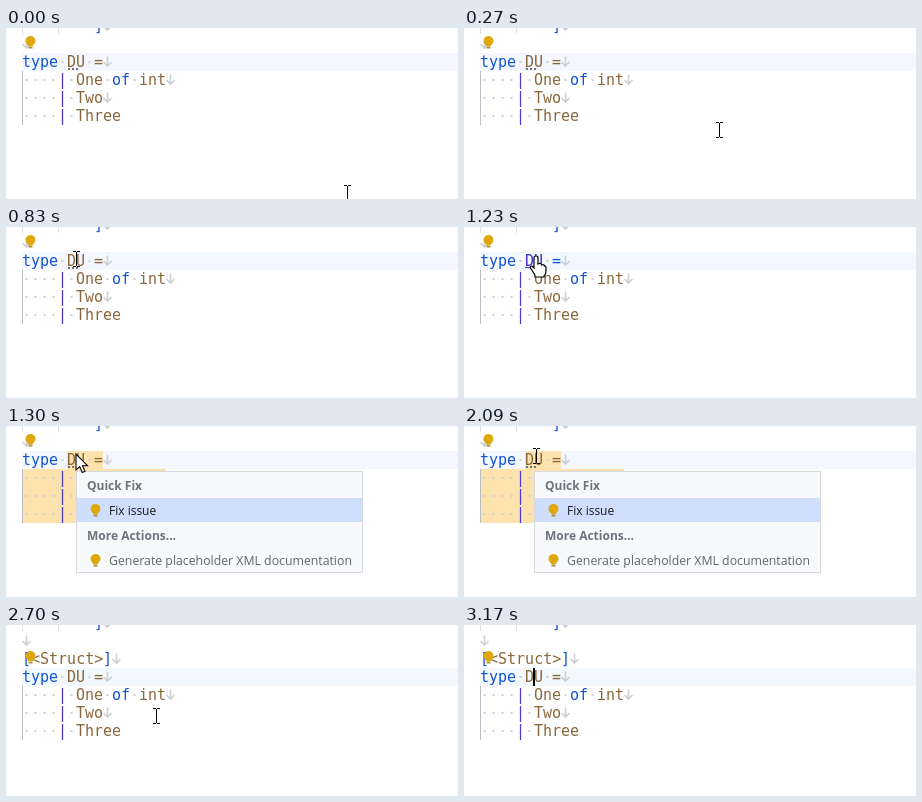
An HTML page for the animation above (3.24 s loop, 452 by 171 pixels).

```html
<!DOCTYPE html>
<html lang="en">
<head>
<meta charset="utf-8">
<style>
  html, body { margin: 0; width: 100%; height: 100%; overflow: hidden; background: #fff; }
  svg { display: block; width: 452px; height: 171px; }
  .code { font: 15px "DejaVu Sans Mono", "Noto Sans Mono", monospace; }
  .menu { font: 12px "Open Sans", "Noto Sans", sans-serif; }
  .head { font-weight: 700; fill: #6e737c; }
</style>
</head>
<body>
<svg viewBox="0 0 452 171">
  <defs>
    <path id="eol" d="M0 -5V4.5M-4 .5L0 4.5L4 .5" fill="none" stroke="#cdd0d3" stroke-width="1.6"/>
    <g id="bulb">
      <path d="M-2.3 3.5C-2.3 2-5 1-5-1.5A5 5 0 0 1 5-1.5C5 1 2.3 2 2.3 3.5Z" fill="#dfa80a"/>
      <path d="M-2 4H2V6H-2Z" fill="#b08d2c"/>
    </g>
  </defs>
  <rect id="line" x="16" width="436" height="18"/>
  <path id="selection" d="M61 25H97V43H160V61H106V79H115V97H16V43H61Z" fill="#fde2ae"/>
  <path d="M16.5 0V6M52.5 0V6" stroke="#dddfe3"/>
  <g id="top" class="code"></g>
  <g id="attribute" class="code"></g>
  <g id="body" class="code">
    <path d="M16.5 43V97" stroke="#b9bec6"/>
  </g>
  <path id="hint" d="M62 41H72" stroke="#75716c" stroke-width="2" stroke-dasharray="2 2"/>
  <path id="link" d="M61 40.5H79" stroke="#4630d2"/>
  <use id="lamp" href="#bulb" x="24.5"/>
  <rect id="caret" x="69" y="43" width="2" height="18"/>
  <g id="popup" class="menu">
    <rect x="70.5" y="45.5" width="286" height="101" fill="#f8f9fb" stroke="#d6d9df"/>
    <rect x="71" y="72" width="285" height="24" fill="#cfdefc"/>
    <use href="#bulb" x="89.5" y="84.5"/>
    <use href="#bulb" x="89.5" y="134.5"/>
    <text class="head" x="81" y="64">Quick Fix</text>
    <text x="103" y="89" fill="#17191c">Fix issue</text>
    <text class="head" x="81" y="114">More Actions...</text>
    <text x="103" y="139" fill="#62656b" font-size="12.3">Generate placeholder XML documentation</text>
  </g>
  <g id="pointer">
    <path id="beam" d="M-3 -6.5H0M1 -6.5H4M.5 -6V8M-3 8.5H0M1 8.5H4" fill="none" stroke="#000"/>
    <path id="hand" d="M-2 1Q-2 -1 0 -1T2 1V7Q5 5.5 5.5 8Q8 7 8.5 9Q10 8.5 10 11V14Q10 17 8 19V20H-1V18L-5.5 11Q-6 9 -4 9L-2 11Z" fill="#fff" stroke="#000" stroke-width="1.2"/>
    <path id="arrow" d="M-1 -1V15L2.7 11.6L5.3 17.5L8 16.3L5.5 10.7H10.5Z" fill="#fff" stroke="#000" stroke-width="1.1"/>
  </g>
</svg>
<script>
const LOOP = 3240;
const BLUE = "#0f54d6", BROWN = "#8a673b", INDIGO = "#4a3bd0", LINK = "#4630d2";
const $ = id => document.getElementById(id);

function add(parent, tag, attrs, text = "") {
  const node = document.createElementNS("http://www.w3.org/2000/svg", tag);
  for (const key in attrs) node.setAttribute(key, attrs[key]);
  node.textContent = text;
  return parent.appendChild(node);
}

const column = n => 16 + 9 * n;
const token = (group, col, y, text, fill) => add(group, "text", { x: column(col), y, fill }, text);
const dot = (group, col, y) =>
  add(group, "rect", { x: column(col) + 3.5, y: y - 6, width: 2, height: 2, fill: "#cdd0d3" });
const lineEnd = (group, col, y) =>
  add(group, "use", { href: "#eol", x: column(col) + 4.5, y: y - 5.5 });

token($("top"), 8, 3, "]", BLUE);
lineEnd($("top"), 9, 3);
lineEnd($("top"), 0, 21);

token($("attribute"), 0, 39, "[", BLUE);
token($("attribute"), 1, 39, "<Struct>", BROWN);
token($("attribute"), 9, 39, "]", BLUE);
lineEnd($("attribute"), 10, 39);

const body = $("body");
token(body, 0, 39, "type", BLUE);
const typeName = token(body, 5, 39, "DU", BROWN);
const equals = token(body, 8, 39, "=", BROWN);
[4, 7].forEach(col => dot(body, col, 39));
lineEnd(body, 9, 39);

["One", "Two", "Three"].forEach((name, i) => {
  const y = 57 + 18 * i;
  [0, 1, 2, 3, 5].forEach(col => dot(body, col, y));
  token(body, 4, y, "|", INDIGO);
  token(body, 6, y, name, BROWN);
});
token(body, 10, 57, "of", BLUE);
token(body, 13, 57, "int", BROWN);
[9, 12].forEach(col => dot(body, col, 57));
lineEnd(body, 16, 57);
lineEnd(body, 9, 75);

// Pointer samples: time, x, y
const moves = [
  [0, 341, 164], [70, 333, 156], [140, 305, 135], [210, 255, 101], [280, 195, 70],
  [350, 144, 49], [410, 107, 37], [480, 86, 32], [550, 81, 29], [620, 71, 24],
  [690, 62, 27], [760, 66, 31], [830, 70, 31], [1030, 72, 30], [1300, 71, 29],
  [2090, 72, 29], [2560, 68, 32], [2630, 98, 52], [2700, 150, 90], [2770, 203, 126]
];

const show = (id, on) => $(id).setAttribute("visibility", on ? "visible" : "hidden");

function render(t) {
  const within = (from, to) => t >= from && t < to;
  const done = t >= 2160, linked = within(1230, 1300);
  const menu = within(1300, 2160), shift = done ? 18 : 0;
  const [, x, y] = moves.findLast(move => move[0] <= t);

  $("pointer").setAttribute("transform", `translate(${x} ${y})`);
  show("beam", t < 1230 || within(2090, 2840));
  show("hand", linked);
  show("arrow", within(1300, 2090));

  body.setAttribute("transform", `translate(0 ${shift})`);
  $("line").setAttribute("y", 25 + shift);
  $("line").setAttribute("fill", done ? "#f2f8fc" : "#f4f7fd");
  $("lamp").setAttribute("y", 14.5 + shift);
  typeName.setAttribute("fill", linked ? LINK : BROWN);
  equals.setAttribute("fill", linked ? BLUE : BROWN);

  show("attribute", done);
  show("selection", menu);
  show("popup", menu);
  show("link", linked);
  show("hint", !done && !linked);
  show("caret", within(2160, 2700) || t >= 3170);
}

const start = performance.now();
function tick() {
  render((performance.now() - start) % LOOP);
  requestAnimationFrame(tick);
}
tick();
</script>
</body>
</html>
```
